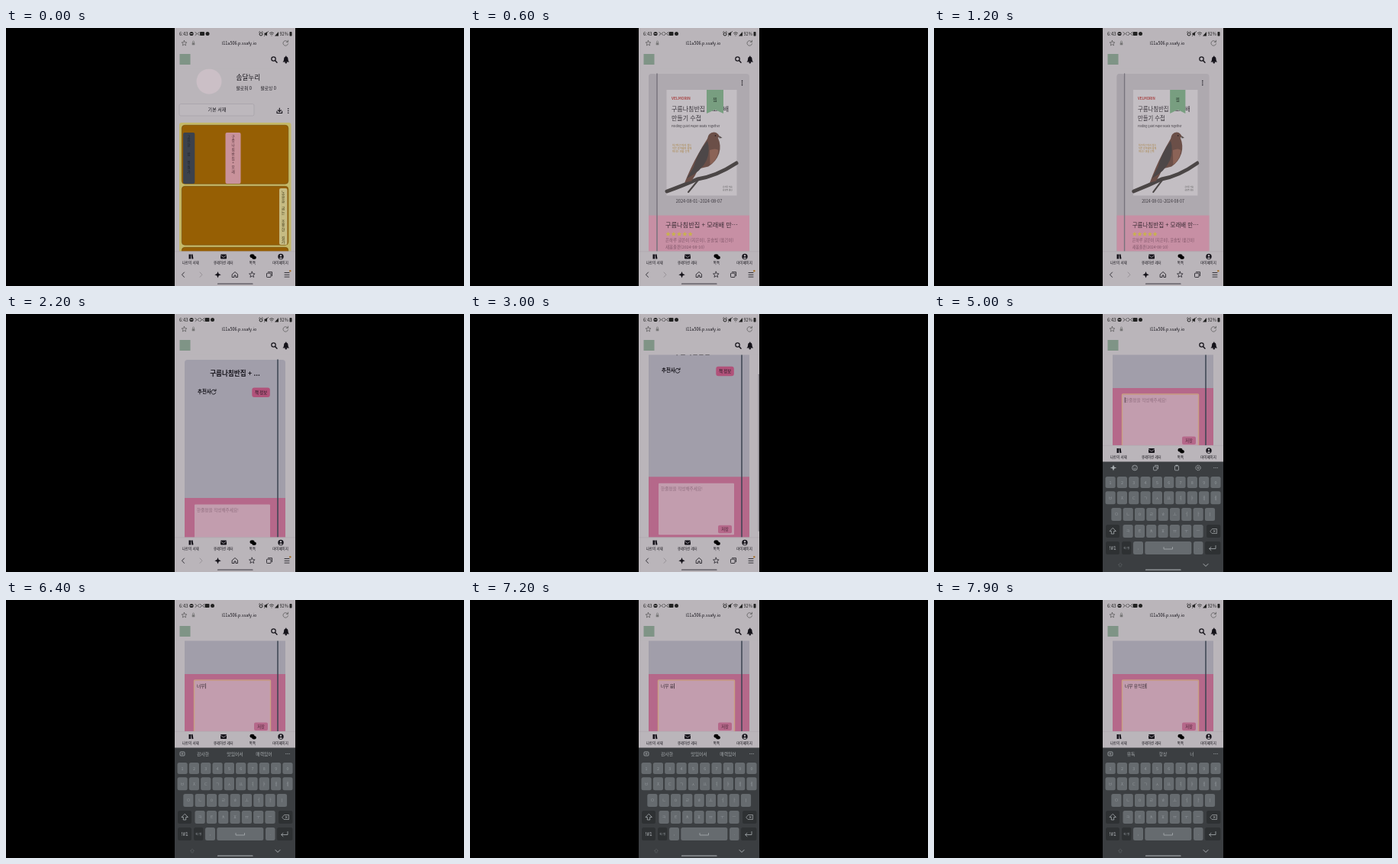
An HTML page for the animation above (8 s loop, 600 by 338 pixels).

```html
<!DOCTYPE html>
<html lang="ko">
<head>
<meta charset="utf-8">
<title>Book diary</title>
<style>
  html, body { margin: 0; width: 100%; height: 100%; overflow: hidden; background: #000; }
  svg { display: block; width: 100vw; height: 100vh; }
  text { font-family: "Noto Sans CJK KR", "Noto Sans CJK", "Noto Sans", sans-serif; white-space: pre; }
</style>
</head>
<body>
<svg id="stage" viewBox="0 0 600 338"></svg>
<script>
const LOOP = 8000;
const PAGE = '#bab5ba', INK = '#15131a', PINK = '#b5688a', KEY = '#666b6f', KEYBG = '#3b3e41';

// ---- drawing helpers ----
const rect = (x, y, w, h, fill, r = 0, more = '') =>
  `<rect x="${x}" y="${y}" width="${w}" height="${h}" rx="${r}" fill="${fill}" ${more}/>`;
const circle = (x, y, r, fill = INK, more = '') => `<circle cx="${x}" cy="${y}" r="${r}" fill="${fill}" ${more}/>`;
const line = (d, color = INK, w = .8, more = '') =>
  `<path d="${d}" fill="none" stroke="${color}" stroke-width="${w}" stroke-linecap="round" stroke-linejoin="round" ${more}/>`;
const shape = (d, fill = INK) => `<path d="${d}" fill="${fill}"/>`;
const text = (x, y, s, size, fill = INK, more = '') =>
  `<text x="${x}" y="${y + size * .36}" font-size="${size}" fill="${fill}" ${more}>${s}</text>`;
const mid = (x, y, s, size, fill = INK, more = '') => text(x, y, s, size, fill, `text-anchor="middle" ${more}`);
const group = (id, body, more = '') => `<g id="${id}" ${more}>${body}</g>`;
const dots = (x, y, dx, dy, fill = INK, r = .8) =>
  [-1, 0, 1].map(i => circle(x + i * dx, y + i * dy, r, fill)).join('');
const star = (x, y, r) => {
  const pts = [...Array(10).keys()].map(i => {
    const a = i * Math.PI / 5 - Math.PI / 2, q = i % 2 ? r * .45 : r;
    return (x + q * Math.cos(a)).toFixed(2) + ' ' + (y + q * Math.sin(a)).toFixed(2);
  });
  return `M${pts.join('L')}Z`;
};
const stack = (x, y, step, s, size, fill) =>
  [...s].map((c, i) => c === ' ' ? '' : mid(x, y + i * step, c, size, fill)).join('');

// ---- phone chrome ----
function statusBar() {
  const notices = line('M248 5.5l2 2-2 2M253 5.5l-2 2 2 2', '#333', .8) +
    group('extra', line('M254.500 5.5l2 2-2 2M259.500 5.5l-2 2 2 2', '#333', .8)) +
    group('late', rect(254, 5, 6, 5, '#222', 1) + circle(264, 7.5, 2.5, '#222'));
  return text(227, 7.5, '6:43', 6, '#222') + circle(243, 7.5, 2.6, '#222') +
    line('M241.800 7.5h2.4', PAGE, .8) + notices +
    circle(334, 8, 2, 'none', 'stroke="#222"') + line('M331.500 5.500l1-1M336.500 5.500l-1-1', '#222') +
    shape('M338.500 6.500h1.500l2-1.500v5.500l-2-1.500h-1.500z', '#222') + line('M338.500 10.500l5-6', '#222', .7) +
    line('M345.500 6.500q2.500-2 5 0M346.500 8.200q1.500-1.200 3 0M348 10v0', '#222') +
    shape('M352 10.500l5-5.500v5.500z', '#222') + text(358.5, 7.5, '92%', 5.6, '#222') +
    rect(371.5, 5, 3, 5.5, '#222', .7);
}

function addressBar() {
  return line(star(233.5, 20, 3.6), '#555', .7) +
    rect(243.7, 19.300, 3.6, 3, '#777', .5) + line('M244.500 19v-1a1 1 0 0 1 2 0v1', '#777', .7) +
    mid(305.5, 20, 'l11a506.p.ssafy.io', 5.5, INK, 'font-weight="500"') +
    line('M369 18a3.300 3.300 0 1 0 .5 2.700M369.500 16.200v2.200h-2.200', '#555', .7);
}

function header() {
  return rect(221, 0, 158, 53.5, PAGE) + statusBar() + addressBar() +
    rect(227.5, 34, 14, 14, '#7f9486') +
    circle(350.5, 40.5, 2.7, 'none', `stroke="${INK}" stroke-width="1.2"`) + line('M352.700 42.700l2.300 2.500', INK, 1.4) +
    shape('M362.500 44.500q1.700-1.500 1.700-4.500a2.600 2.600 0 0 1 5.200 0q0 3 1.700 4.500z') + circle(366.8, 45.3, 1.2) + circle(366.8, 37.3, .8);
}

function nav() {
  const label = (x, s) => mid(x, 307.5, s, 4.5, INK, 'font-weight="500"');
  return rect(221, 292.5, 158, 21.5, PAGE) + line('M221 292.800H379', '#a8a3a9', .5) +
    rect(239.5, 296.5, 2.7, 6, INK) + shape('M242.500 296.700l2-.4 1 6-2 .4z') +
    rect(281, 296.5, 8, 6, INK, 1) + line('M281.500 298l3.500 2.500 3.500-2.500', PAGE, .7) +
    `<ellipse cx="322.500" cy="298.700" rx="3" ry="2.400"/><ellipse cx="325" cy="300.700" rx="2.800" ry="2.200"/>` +
    circle(360, 299.5, 3.7) + circle(360, 298.3, 1.2, PAGE) + shape('M357.800 301.800q2.200-2.500 4.400 0q-2.200 1.600-4.400 0z', PAGE) +
    label(241.7, '나만의 서재') + label(284.7, '큐레이션 레터') + label(323, '톡톡') + label(359.5, '마이페이지');
}

function browserBar() {
  return rect(221, 313.5, 158, 24.5, PAGE) +
    line('M233.500 320l-3 3.200 3 3.200') + line('M254 320l3 3.200-3 3.200', '#8e898f') +
    shape('M277.500 319l1.200 3 3 1.200-3 1.200-1.200 3-1.200-3-3-1.200 3-1.200z') +
    line('M296.500 322.500l3.500-3 3.500 3v4h-2.500v-2.500h-2v2.500h-2.500z') +
    line(star(322.3, 323.2, 4), INK, .7) +
    rect(341.5, 321.2, 5.5, 5.3, 'none', .8, `stroke="${INK}" stroke-width=".8"`) + line('M343.500 319.700h5v5') +
    line('M365 320.500h6M365 323.300h6M365 326.100h6') + circle(372.3, 318.3, 1.2, '#a8742c') +
    line('M277.500 335.200h45.500', '#55515a', 1.2);
}

// ---- pages ----
function shelfPage() {
  const board = y => rect(230.3, y, 139.5, 77, '#965f04', 4, 'stroke="#6f4a0c" stroke-width=".6"');
  return circle(266, 70, 16.5, '#cbbfc6') +
    text(301.5, 65, '솜달누리', 8.6, INK, 'font-weight="500"') +
    text(301.5, 79, '팔로워 0', 5.7, INK, 'font-weight="500"') + text(333.5, 79, '팔로잉 0', 5.7, INK, 'font-weight="500"') +
    rect(227, 99.500, 98, 15.5, '#bdb8bd', 2, 'stroke="#a39ea5" stroke-width=".6"') +
    mid(276.5, 107, '기본 서재', 6, INK, 'font-weight="500"') +
    line('M358.300 105v4.500M356.300 107.700l2 2 2-2M355 109v2.500h6.600V109', INK, 1.1) + dots(369.7, 108.5, 0, 2.7) +
    rect(227, 124, 146.500, 175, '#c4b868', 3) + board(127.3) + board(207.3) + board(287.3) +
    rect(232, 137, 15.3, 67, '#3c424d', 2) + stack(239.5, 142, 5.8, '고요한 밤 정원가', 4.4, '#1c2129') +
    rect(287.500, 137, 20, 67, '#c9929b', 2) + stack(297.5, 142, 5.8, '구름나침반집+모래', 4.6, '#51303a') +
    rect(358, 210, 10.5, 74, '#c6bb83', 2) + stack(363.2, 215, 5.45, '노을을 굽는 조용한 길가', 4.7, '#3a3413');
}

function cover() {
  const bird = shape('M311 145q1-8 8.500-8.500q6 .5 7.500 6.500l-2.300 .5q5 11 1.500 21q-4 11-14 17l-13 3q-4 9-9 16l-9 2q9-22 17-36q6-11 12.800-21.500z', '#6b4f48') +
    shape('M311 148q-13 15-18 34l-9 15q19-9 26-24q5-13 1-25z', '#4d4748') +
    shape('M314 160q8-3 11.500 0q-1 13-11 19z', '#8b6357') + circle(321.5, 141, .8, INK) +
    shape('M326.500 141l4 3-4 .5z', '#57504f');
  const branch = line('M258 214q22-8 40-16q25-4 51-21', '#4b4646', 5) + line('M300 198l-14 17', '#4b4646', 2);
  return rect(257.500, 81, 92, 138.500, '#c3bec3') + branch + bird +
    text(264, 92, 'VELMORIN', 4.8, '#a94848', 'font-weight="700"') +
    text(264, 106, '구름나침반집 + 모래배', 8, '#39353c') + text(264, 118, '만들기 수첩', 8, '#39353c') +
    text(264, 129, 'Folding Quiet Paper Boats Together', 3.8, '#39353c') +
    ['차근차근 따라 접는', '작은 종이배와 함께', '떠나는 여름 산책'].map((s, i) => text(265, 153.5 + i * 4.3, s, 3.2, '#a9803e')).join('') +
    text(331, 208.5, '은하루 지음', 2.6, '#555') + text(331, 212, '윤솔빛 옮김', 2.6, '#555') +
    shape('M310 81h22v31l-11-5-11 5z', '#789e80') + mid(321, 93.5, '찜', 6, '#25352a');
}

function frontCard() {
  return rect(234, 60, 132, 263, '#aea9af', 4) + rect(234, 60, 10, 263, '#a7a2a9', 4) +
    rect(234, 245.500, 132, 77.5, '#c78fa4', 0) + line('M245 60V323', '#77737c', 1.5) + dots(356.5, 72, 0, 2.6) +
    cover() + mid(300, 227, '2024-08-01~2024-08-07', 5.6, '#3b373e') +
    text(256, 258.500, '구름나침반집 + 모래배 만…', 8.2, '#3b2c35', 'font-weight="500"') +
    [0, 1, 2, 3, 4].map(i => shape(star(259.5 + i * 7.3, 270, 3.3), '#c9b14e')).join('') +
    text(256, 278.5, '은하루 글쓴이 (지은이), 윤솔빛 (옮긴이)', 5.4, '#82576a') +
    text(256, 287.5, '새봄출판(2024-08-10)', 5.4, '#82576a');
}

function backCard() {
  return rect(234, 60, 132, 263, '#a19eaa', 4) +
    shape('M234 241H366V319q0 4-4 4H238q-4 0-4-4z', PINK) + line('M356 60V323', '#3b4350', 1.5, 'stroke-linecap="butt"') +
    mid(300, 77.500, '구름나침반집 + ...', 8.6, INK, 'font-weight="700"') +
    text(251, 102, '추천사', 6.4, INK, 'font-weight="700"') +
    line('M274.500 100.500a3 3 0 1 0 .3 2.700M275 98.700v2.200h-2.200', INK, .9) +
    rect(322.300, 96.5, 23.5, 12.5, '#b1527a', 3) + mid(334, 102.7, '책 정보', 5.3, INK, 'font-weight="500"') +
    rect(247, 249.500, 99, 67.5, '#c29dae', 1) +
    group('focus', rect(246.5, 249, 100, 68.5, 'none', 1, 'stroke="#c9a084" stroke-width="1.400"')) +
    group('hint', text(250, 257, '한줄평을 작성해주세요!', 5.6, '#8f6d7e')) +
    '<text id="typed" x="250" y="258.500" font-size="5.600" fill="#2b2229"></text>' +
    rect(249.8, 253.2, .7, 7, '#2b2229', 0, 'id="caret"') +
    rect(325, 304.500, 18, 10.5, PINK, 2) + mid(334, 309.7, '저장', 5.2, '#4b2437');
}

// ---- keyboard ----
function keyboard() {
  const PITCH = 15.32;
  const key = (x, y, w, s, fill = KEY, size = 5.4, ink = '#91979b') =>
    rect(x, y, w, y < 220 ? 15 : 17, fill, 2.5) + mid(x + w / 2, y + 8.5, s, size, ink);
  const row = (x, y, chars) => [...chars].map((c, i) => key(x + i * PITCH, y, 13.2, c)).join('');
  const light = '#a9aeb1', dark = '#2e3133';
  const tools = shape('M235 197.500l1.200 3 3 1-3 1-1.200 3-1.200-3-3-1 3-1z', light) +
    circle(263, 201.5, 3.4, 'none', `stroke="${light}" stroke-width=".8"`) + line('M261.500 202.500q1.500 1.500 3 0M261.800 200.300v0M264.200 200.300v0', light) +
    rect(287.5, 200, 4.6, 4.8, 'none', 1, `stroke="${light}" stroke-width=".8"`) + line('M289.500 198.300h4v4.500', light) +
    rect(315.5, 198.8, 5, 6, 'none', .8, `stroke="${light}" stroke-width=".8"`) + line('M317 198.500h2', light, 1.3) +
    circle(346, 201.5, 3.2, 'none', `stroke="${light}" stroke-width="1" stroke-dasharray="1.700 .5"`) + circle(346, 201.5, 1.2, 'none', `stroke="${light}" stroke-width=".7"`);
  const words = rect(228, 199, 6, 5, 'none', 1, `stroke="${light}" stroke-width=".8"`) + line('M231 200.300v2.400M230 201.500h2', light, .6) +
    [258, 300, 338].map((x, i) => `<text id="word${i}" x="${x}" y="203.700" font-size="5.800" text-anchor="middle" fill="${light}"></text>`).join('');
  return rect(221, 193.5, 158, 145, KEYBG) + group('tools', tools) + group('words', words) + dots(369, 201.5, 2.2, 0, light, .6) +
    row(224.5, 213, '1234567890') + row(224.5, 232.3, 'ㅂㅈㄷㄱㅅㅛㅕㅑㅐㅔ') +
    row(232.3, 254, 'ㅁㄴㅇㄹㅎㅗㅓㅏㅣ') + row(247.5, 276, 'ㅋㅌㅊㅍㅠㅜㅡ') +
    key(225, 276, 18, '', dark) + line('M234 280.500l-4 4h2.300v3.500h3.400v-3.500h2.300z', light) +
    key(357, 276, 18.5, '', dark) + line('M362 284.500l2.500-3h6v6h-6zM366 283.200l2.500 2.600M368.500 283.200l-2.500 2.600', light, .7) +
    key(225, 298, 18, '!#1', dark, 6.6, '#b8bdc0') + key(246, 298, 12.5, '한/영', dark, 3.6) +
    key(261, 298, 13, ',') + key(276.300, 298, 61, '') + line('M301 305.500v2.500h11.500v-2.500', light) +
    key(340, 298, 12.5, '.') + key(355, 298, 20.5, '', dark) + line('M369 303.500v4h-8M363 305.200l-2.300 2.300 2.300 2.300', light) +
    line('M241.500 328.500l2.500-2.500 2.500 2.500h-1.300v2.500h-2.400v-2.500z', '#54585b', .8) +
    line('M353 327.500l3 3 3-3', light, 1) + line('M277.500 335.200h45.500', '#a0a4a7', 1.2);
}

const stage = document.getElementById('stage');
stage.innerHTML = rect(0, 0, 600, 338, '#000') +
  '<clipPath id="screen"><rect x="221" width="158" height="338"/></clipPath><g clip-path="url(#screen)">' +
  rect(221, 0, 158, 338, PAGE) + group('shelf', shelfPage()) +
  group('book', group('front', frontCard()) + group('back', backCard())) +
  group('bar', rect(377.7, 82, 1, 206, '#77737b', .5)) +
  group('touch', circle(308, 234, 2.8, '#d3c4cc', 'opacity=".8"')) +
  header() + browserBar() + group('nav', nav()) + group('keys', keyboard()) + '</g>';

const el = Object.fromEntries([...stage.querySelectorAll('[id]')].map(e => [e.id, e]));

// ---- timeline ----
const OPEN = 600, FLIP = [1020, 1820], SCROLL = [2600, 3100], FOCUS = 3900, RISE = [4250, 4450];
const TYPING = [[0, ''], [5600, 'ㄴ'], [5800, '너'], [6000, '넘'], [6200, '너무'], [6600, '너무 '], [6800, '너무 ㅇ'],
  [6950, '너무 유'], [7150, '너무 융'], [7250, '너무 유이'], [7400, '너무 유익'], [7550, '너무 유익ㅎ'], [7700, '너무 유익하'], [7800, '너무 유익한']];
const WORDS = [[0, '감사한,맛있어서,매력있어'], [7400, '유독,항상,너']];

const at = (table, t) => table.filter(([start]) => start <= t).pop()[1];
const part = ([a, b], t) => Math.min(1, Math.max(0, (t - a) / (b - a)));
const ease = p => p * p * (3 - 2 * p);
const show = (e, on) => e.setAttribute('visibility', on ? 'inherit' : 'hidden');
const move = (e, y) => e.setAttribute('transform', `translate(0 ${y})`);

function render(t) {
  const turn = Math.cos(Math.PI * ease(part(FLIP, t)));
  const rise = ease(part(RISE, t)), raised = rise === 1;
  const scroll = 31 * ease(part(SCROLL, t)) + (raised ? 113 : 0);
  const typed = at(TYPING, t), focused = t >= FOCUS;

  show(el.shelf, t < OPEN);
  show(el.book, t >= OPEN);
  show(el.front, t >= OPEN && turn > 0);
  show(el.back, t >= OPEN && turn <= 0);
  const w = Math.max(.001, Math.abs(turn));
  el.book.setAttribute('transform', `translate(${300 * (1 - w)} ${-scroll}) scale(${w} 1)`);

  show(el.extra, t >= OPEN);
  el.late.setAttribute('transform', `translate(${t >= OPEN ? 6.5 : 0} 0)`);
  show(el.bar, t >= SCROLL[0] && !raised);
  move(el.bar, scroll - 31);
  show(el.touch, t >= FOCUS && t < 4200);

  const back = t >= OPEN && turn <= 0;
  show(el.focus, back && focused);
  show(el.hint, back && !typed);
  if (el.typed.textContent !== typed) el.typed.textContent = typed;
  const width = typed ? [...typed].reduce((sum, c) => sum + (c === ' ' ? 1.25 : 5.15), .8) : 0;
  el.caret.setAttribute('x', 249.8 + width);
  show(el.caret, back && focused && (typed || (t - FOCUS) % 1000 < 500 || t >= 4900 && t < 5400));

  move(el.nav, raised ? -120.5 : 0);
  show(el.keys, rise > 0);
  move(el.keys, 145 * (1 - rise));
  show(el.tools, rise > 0 && !typed);
  show(el.words, rise > 0 && typed);
  at(WORDS, t).split(',').forEach((s, i) => {
    const e = el['word' + i];
    if (e.textContent !== s) e.textContent = s;
  });
}

const begin = performance.now();
function tick() {
  render((performance.now() - begin) % LOOP);
  requestAnimationFrame(tick);
}
tick();
</script>
</body>
</html>
```
